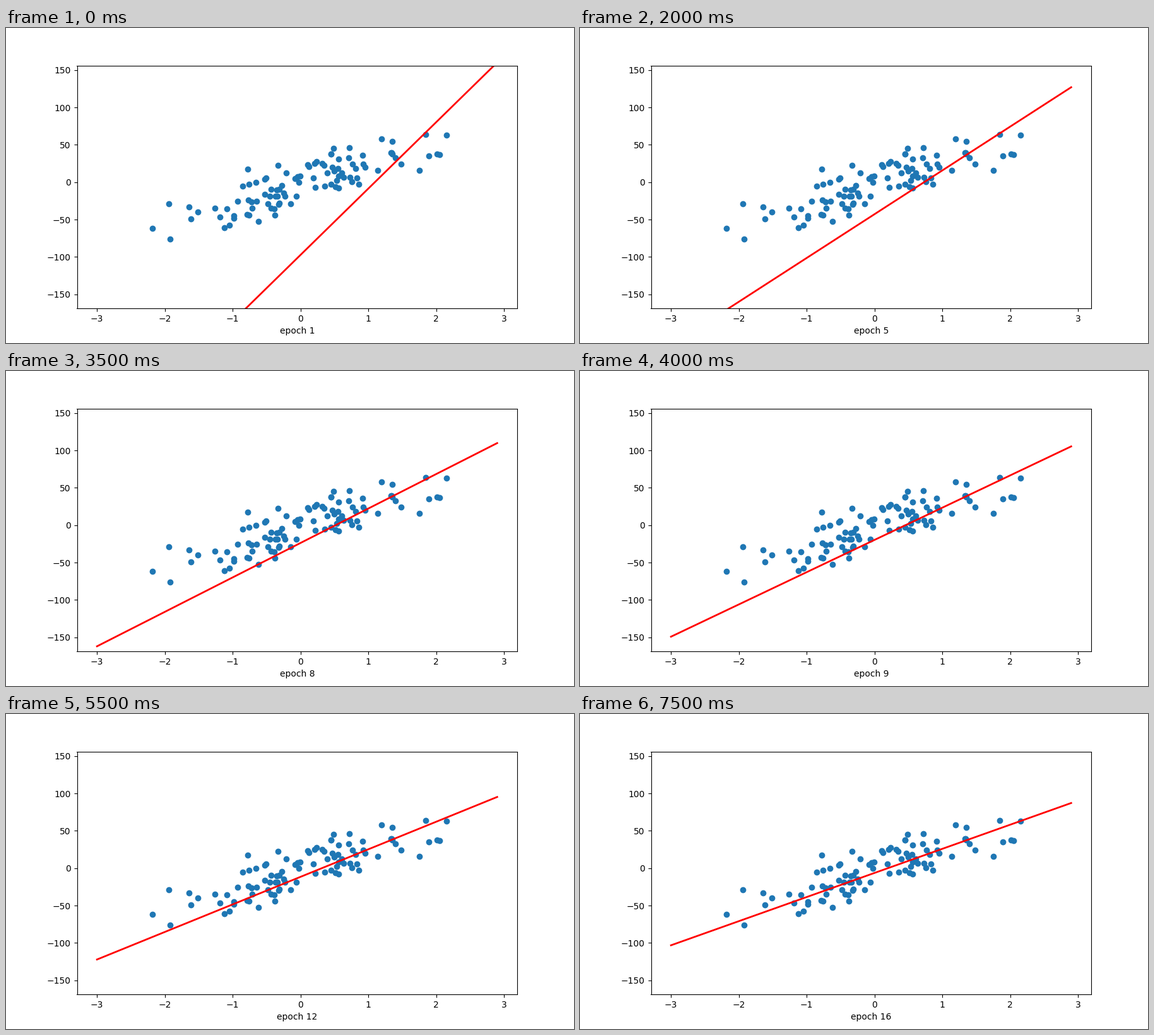
Recreate the animation shown at these times as a matplotlib script. Size 900 by 500 pixels, loop 8 s.

```python
import numpy as np
import matplotlib.pyplot as plt
from matplotlib.animation import FuncAnimation

EPOCHS = 16
RATE = 0.001


def make_data(n=100, noise=20, seed=13):
    """Noisy linear data with a random slope."""
    rng = np.random.RandomState(seed)
    x = rng.standard_normal(n)
    slope = 100 * rng.uniform()
    return x, slope * x + rng.normal(scale=noise, size=n)


def descend(x, y, m=100.0, b=-120.0):
    """Slope and intercept after each step of batch gradient descent."""
    steps = []
    for _ in range(EPOCHS):
        err = y - m * x - b
        m, b = m + 2 * RATE * (err @ x), b + 2 * RATE * err.sum()
        steps.append((m, b))
    return steps


x, y = make_data()
steps = descend(x, y)

fig, ax = plt.subplots(figsize=(9, 5), dpi=100)
xs = np.arange(-3, 3, 0.1)
ax.scatter(x, y)
line, = ax.plot(xs, xs * 50 - 4, "r-", linewidth=2)


def update(i):
    m, b = steps[i]
    line.set_ydata(m * xs + b)
    ax.set_xlabel(f"epoch {i + 1}")
    return line,


anim = FuncAnimation(fig, update, frames=EPOCHS, interval=500,
                     repeat=True, repeat_delay=0)
plt.show()
```
